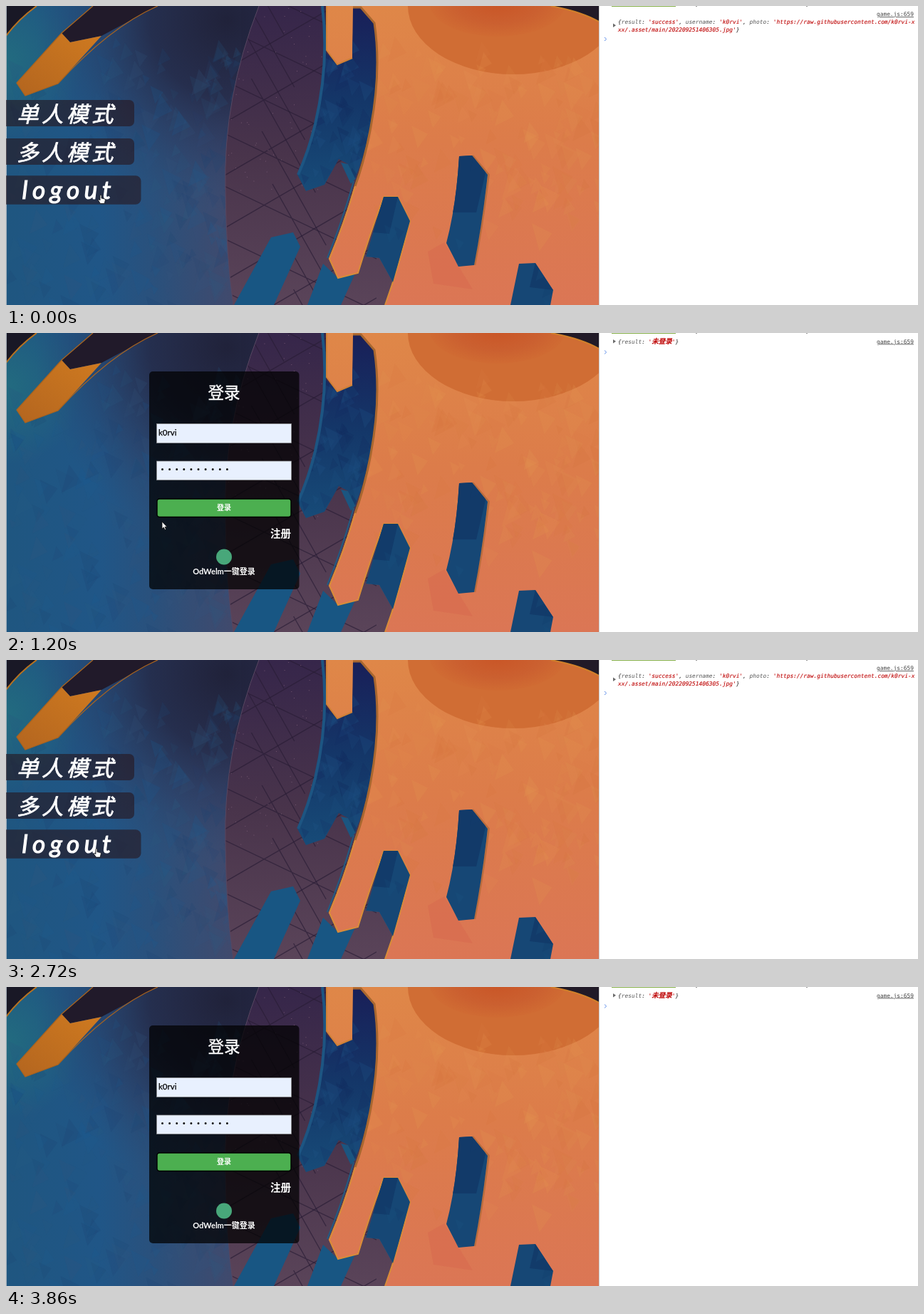
These frames come from a looping animation (1280 px wide and 420 px high, 4.07 s). An HTML page:

```html
<!DOCTYPE html>
<html lang="zh">
<head>
<meta charset="utf-8">
<style>
  html, body { margin: 0; width: 100%; height: 100%; overflow: hidden; background: #fff; }
  svg { display: block; width: 1280px; height: 420px; }
  text { font-family: Lato, "Noto Sans CJK SC", "Noto Sans CJK", sans-serif; fill: #fff; }
  .item { font-size: 30.5px; font-style: italic; letter-spacing: 4.4px; stroke: #fff; stroke-width: .8px; }
  .latin { font-size: 32px; letter-spacing: 6px; stroke-width: 1.1px; }
  .field { font-size: 10px; }
  .mid { text-anchor: middle; }
  .console text { font: italic 7.86px "DejaVu Sans Mono", "Noto Sans CJK SC", "Noto Sans CJK", monospace; fill: #222; }
  .console .key { fill: #555; }
  .console .str { fill: #c00d0d; stroke: #c00d0d; stroke-width: .15px; }
  .console .han { font-size: 9.5px; font-weight: 700; }
  .console .link { font-style: normal; fill: #444; text-anchor: end; text-decoration: underline; }
</style>
</head>
<body>
<svg viewBox="0 0 1280 420">
  <defs>
    <linearGradient id="blue">
      <stop offset="0" stop-color="#1f5680"/><stop offset=".4" stop-color="#205687"/>
      <stop offset=".65" stop-color="#2b507b"/><stop offset="1" stop-color="#43496b"/>
    </linearGradient>
    <radialGradient id="shade" gradientUnits="userSpaceOnUse" cx="310" cy="20" r="270">
      <stop offset="0" stop-color="#20223a"/><stop offset=".4" stop-color="#242a48" stop-opacity=".88"/>
      <stop offset=".7" stop-color="#2a3a60" stop-opacity=".5"/><stop offset="1" stop-color="#2a4a74" stop-opacity="0"/>
    </radialGradient>
    <radialGradient id="teal" gradientUnits="userSpaceOnUse" cx="0" cy="75" r="110">
      <stop offset="0" stop-color="#23707f" stop-opacity=".8"/><stop offset="1" stop-color="#23707f" stop-opacity="0"/>
    </radialGradient>
    <linearGradient id="purple" x2="0" y2="1">
      <stop offset="0" stop-color="#36264a"/><stop offset=".5" stop-color="#49344b"/><stop offset="1" stop-color="#5a4459"/>
    </linearGradient>
    <linearGradient id="orange" x2="0" y2="1">
      <stop offset="0" stop-color="#df8748"/><stop offset=".45" stop-color="#dc7c4a"/><stop offset="1" stop-color="#db7655"/>
    </linearGradient>
    <linearGradient id="navy" x2="0" y2="1">
      <stop offset="0" stop-color="#191f58"/><stop offset=".5" stop-color="#143668"/><stop offset="1" stop-color="#174b78"/>
    </linearGradient>
    <linearGradient id="amber" x1="1" y1="0" x2="0" y2="1">
      <stop offset="0" stop-color="#cf7a20"/><stop offset="1" stop-color="#b3651f"/>
    </linearGradient>
    <radialGradient id="glow"><stop offset="0" stop-color="#c95526"/><stop offset=".62" stop-color="#cb6030"/><stop offset="1" stop-color="#d06b33"/></radialGradient>
    <clipPath id="stage"><path d="M0 0H832V420H0Z"/></clipPath>
    <clipPath id="blueClip"><path d="M0 0H355Q304 130 308 260Q309 350 319 420H0Z"/></clipPath>
    <clipPath id="purpleClip"><path d="M355 0H520V420H319Q309 350 308 260Q304 130 355 0Z"/></clipPath>
    <clipPath id="orangeClip"><path id="orangeShape" d="M450 0V62L465 82L486 73L488 1L498 2L516 24Q526 90 511 170Q502 218 489 253Q474 305 453 355L466 382L494 375Q510 322 530 268H550L567 302Q552 365 532 420H832V0Z"/></clipPath>
    <clipPath id="navyClip"><path id="navyShape" d="M447 64L465 82L486 73L487 3L498 2L516 24Q526 90 511 170Q502 214 490 242L480 222L467 215L447 251L421 260L409 237Q446 150 447 64Z"/></clipPath>
    <clipPath id="holeClip"><path id="holeShape" d="M636 211L654 210L676 237Q669 302 657 364L635 366L618 333Q632 280 636 211ZM720 362L743 361L768 399L764 420H708ZM530 268H550L567 302L543 388L524 354L505 352Z"/></clipPath>
  </defs>

  <g clip-path="url(#stage)">
    <path d="M0 0H832V420H0Z" fill="url(#purple)"/>
    <g clip-path="url(#purpleClip)" id="grid" stroke="#291d35" stroke-width="1.4" stroke-opacity=".65"/>
    <g clip-path="url(#blueClip)">
      <path d="M0 0H330V420H0Z" fill="url(#blue)"/>
      <path d="M0 0H360V420H0Z" fill="url(#teal)"/>
      <path d="M0 0H360V420H0Z" fill="url(#shade)"/>
      <g id="blueFacets"/>
    </g>
    <path d="M355 0Q304 130 308 260Q309 350 319 420" fill="none" stroke="#574660"/>
    <path d="M0 0H42Q20 16 0 42Z" fill="#191826"/>
    <path d="M0 42Q18 18 43 0" fill="none" stroke="#b8711f" stroke-width="2"/>
    <path d="M78 38L122 0H212L134 42L90 51Z" fill="#211a2a"/>
    <path d="M15 108L78 38L90 51L134 42L73 109L27 126Z" fill="url(#amber)"/>
    <path d="M122 0L78 38L15 108L27 126L73 109Q145 30 213 0" fill="none" stroke="#a8631f" stroke-width="1.3"/>

    <path d="M320 420L372 325L403 318L413 338L376 420ZM423 420L445 362L466 382L490 376L470 420Z" fill="#185683"/>
    <path d="M480 222L491 242L484 250L470 220Z" fill="#1b5580"/>
    <use href="#orangeShape" fill="url(#orange)"/>
    <g clip-path="url(#orangeClip)">
      <ellipse cx="712" cy="0" rx="148" ry="96" fill="#d06d34"/>
      <ellipse cx="690" cy="-5" rx="96" ry="48" fill="url(#glow)"/>
      <g id="orangeFacets"/>
      <path d="M592 345L615 332L655 398L600 390Z" fill="#d8694f" opacity=".5"/>
      <path d="M765 0Q808 8 832 22V0Z" fill="#211a27"/>
      <path d="M765 0Q808 8 832 22" fill="none" stroke="#d0802a" stroke-width="2"/>
    </g>
    <use href="#navyShape" fill="url(#navy)"/>
    <g clip-path="url(#navyClip)" id="navyFacets"/>
    <g fill="none" stroke-width="2">
      <path d="M487 2L498 2L517 24Q527 90 512 170Q503 218 490 253" stroke="#a8672f" stroke-width="3"/>
      <path d="M490 253Q475 305 454 355L466 382L494 375Q510 322 530 268H550L567 302Q552 365 532 420" stroke="#d98d38"/>
      <path d="M488 246Q471 305 451 354" stroke="#215b83"/>
      <path d="M444 0Q454 80 434 166Q425 203 410 237" stroke="#1d5582" stroke-width="4"/>
      <path d="M450 0V62L465 82L486 73" stroke="#cf8136"/>
      <path d="M655 210L677.500 237Q670 302 658 364" stroke="#b96d3d" stroke-width="2.500"/>
    </g>
    <use href="#holeShape" fill="#164775"/>
    <g clip-path="url(#holeClip)">
      <path d="M636 205H680L660 290H620Z" fill="#123a69"/>
      <path d="M530 268H550L538 320L515 318Z" fill="#123b6a"/>
      <path d="M743 361L768 399L735 395Z" fill="#123b6a"/>
      <path d="M505 352L524 354L543 388Z" fill="#20638d"/>
      <g id="holeFacets"/>
    </g>
    <path d="M0 0H1V420H0Z" fill="#aab4bd"/>
  </g>

  <g id="menu">
    <g fill="#27151c" fill-opacity=".6">
      <rect x="-10" y="132" width="190" height="37" rx="7"/>
      <rect x="-10" y="186" width="190" height="37" rx="7"/>
    </g>
    <text class="item mid" x="85" y="162.500">单人模式</text>
    <text class="item mid" x="85" y="216.500">多人模式</text>
    <g id="logout">
      <rect x="-10" y="240" width="190" height="37" rx="7" fill="#27151c" fill-opacity=".6"/>
      <text class="item latin mid" x="88" y="270">logout</text>
    </g>
  </g>

  <g id="panel">
    <rect x="201" y="54" width="210.500" height="306" rx="5" fill-opacity=".73"/>
    <text class="mid" x="306" y="92" font-size="22.500" stroke="#fff" stroke-width=".4">登录</text>
    <g id="boxes" stroke="#8b8b8b" stroke-width=".7">
      <rect x="211.500" y="127.500" width="189" height="27"/>
      <rect x="211.500" y="180" width="189" height="26.500"/>
    </g>
    <g id="hints">
      <text class="field" x="214" y="144" style="fill:#757575">用户名</text>
      <text class="field" x="214" y="196" style="fill:#757575">密码</text>
    </g>
    <g id="filled">
      <text x="214" y="143.500" font-size="11.500" stroke="#000" stroke-width=".25" style="fill:#000">k0rvi</text>
      <path d="M219.500 191.500H311" stroke="#111" stroke-width="3" stroke-linecap="round" stroke-dasharray="0 10.100"/>
    </g>
    <rect x="212" y="233" width="188" height="25.500" rx="3.500" fill="#4caf50" stroke="#000" stroke-width="1.400"/>
    <text class="field mid" x="306" y="248.500" font-weight="700">登录</text>
    <text x="400" y="287" font-size="14.500" font-weight="700" text-anchor="end">注册</text>
    <circle cx="306" cy="314.500" r="11" fill="#48a77a"/>
    <text class="mid" x="306" y="338.500" font-size="11" font-weight="700">OdWelm一键登录</text>
  </g>

  <g class="console">
    <path d="M832 0H1280V420H832Z" fill="#fff"/>
    <path d="M832.500 0V420" stroke="#c9c9c9"/>
    <path d="M850 0H940V1H850Z" fill="#86b04a"/>
    <path d="M968 0h2v.8h-2zM1123 0h2v.8h-2z" fill="#777"/>
    <g id="userLog">
      <text class="link" x="1274" y="14">game.js:659</text>
      <path d="M852 24.500V30L856 27.200Z" fill="#6b6b6b"/>
      <text x="859" y="24.500">{<tspan class="key">result</tspan>: <tspan class="str">'success'</tspan>, <tspan class="key">username</tspan>: <tspan class="str">'k0rvi'</tspan>, <tspan class="key">photo</tspan>: <tspan class="str">'https://raw.githubusercontent.com/k0rvi-x</tspan></text>
      <text x="859" y="35.500"><tspan class="str">xx/.asset/main/202209251406305.jpg'</tspan>}</text>
    </g>
    <g id="guestLog">
      <text class="link" x="1274" y="14.500">game.js:659</text>
      <path d="M852 9V14.500L856 11.700Z" fill="#6b6b6b"/>
      <text x="859" y="14.500">{<tspan class="key">result</tspan>: <tspan class="str">'<tspan class="han">未登录</tspan>'</tspan>}</text>
    </g>
    <g id="successLog">
      <text class="link" x="1274" y="31">game.js:619</text>
      <path d="M852 25.500V31L856 28.200Z" fill="#6b6b6b"/>
      <text x="859" y="31">{<tspan class="key">result</tspan>: <tspan class="str">'success'</tspan>}</text>
    </g>
    <path id="prompt" d="M840 -2.500L842.700 0L840 2.500" fill="none" stroke="#5f8fe8"/>
  </g>

  <g id="cursor" stroke="#111" stroke-width=".8" stroke-linejoin="round" fill="#fff">
    <path id="arrow" d="M0 0V10L2.300 8L4 11.500L5.500 10.800L4 7.400H7Z"/>
    <path id="hand" d="M-1 1Q0 -.6 1 1V5L5.500 6Q6.500 6.400 6.300 8L5.200 12.500H-.5L-3.500 8Q-3.600 6.300 -2.200 7L-1 8Z"/>
  </g>
</svg>

<script>
const LOOP = 4070;
const $ = id => document.getElementById(id);
const show = (id, on) => $(id).setAttribute('display', on ? 'inline' : 'none');
const within = (t, from, to) => t >= from && t < to;

let seed = 7;
const random = () => (seed = (seed * 16807) % 2147483647) / 2147483647;
const pick = list => list[Math.floor(random() * list.length)];

// Scatter slanted triangles over an area for the faceted paint texture.
function facets(id, count, [x0, y0, x1, y1], colors, size, alpha) {
  let out = '';
  for (let i = 0; i < count; i++) {
    const x = x0 + random() * (x1 - x0), y = y0 + random() * (y1 - y0);
    const s = size * (0.5 + random()), flip = random() < 0.5 ? -1 : 1;
    out += `<path d="M${x} ${y}l${s * 0.8} ${flip * s * 0.4}l${-s * 0.5} ${flip * s * 0.7}z" ` +
      `fill="${pick(colors)}" opacity="${alpha * (0.4 + random() * 0.6)}"/>`;
  }
  $(id).innerHTML = out;
}
facets('blueFacets', 230, [0, 60, 320, 420], ['#1b5b90', '#34557c', '#1d4270', '#285a80'], 24, 0.24);
facets('orangeFacets', 150, [500, 70, 832, 310], ['#e0924f', '#d5753f', '#dd8b4f'], 24, 0.28);
facets('navyFacets', 60, [410, 60, 520, 255], ['#1d4a7c', '#122c5f', '#1d4f80'], 22, 0.38);
facets('holeFacets', 25, [505, 210, 770, 420], ['#1c5580', '#123c6a'], 20, 0.4);

// Crossing girders behind the tubes, with faint dust.
let girders = '';
for (let y = -120; y < 540; y += 74) {
  girders += `<path d="M300 ${y}l220 105M300 ${y + 66}l220 -128M${300 + (y + 120) / 5} ${y}l90 160"/>`;
}
for (let i = 0; i < 60; i++) {
  girders += `<circle cx="${310 + random() * 140}" cy="${random() * 260}" r=".5" stroke="none" fill="#80627a"/>`;
}
$('grid').innerHTML = girders;

// time, x, y of the pointer tip
const path = [
  [0, 133, 265], [30, 133, 265], [80, 132, 261], [1050, 132, 261], [1200, 219, 265], [1320, 219, 265],
  [1560, 310, 249], [1590, 310, 249], [1650, 314, 248], [2240, 314, 248], [2430, 186, 262],
  [2530, 186, 262], [2750, 118, 265], [2780, 114, 266], [2990, 114, 266], [3170, 291, 250],
  [3210, 291, 250], [3490, 560, 370], [3700, 820, 425], [LOOP, 820, 425]
];
function pointer(t) {
  const i = path.findIndex(p => p[0] > t);
  const [t0, x0, y0] = path[i - 1], [t1, x1, y1] = path[i];
  const k = (t - t0) / (t1 - t0);
  return [x0 + (x1 - x0) * k, y0 + (y1 - y0) * k];
}

function draw(t) {
  const login = within(t, 775, 2400) || t >= 3210;
  const filled = within(t, 1080, 2400) || t >= 3520;
  show('panel', login);
  show('menu', !login);
  show('filled', filled);
  show('hints', !filled);
  $('boxes').setAttribute('fill', filled ? '#e8f0fe' : '#fff');

  const grow = t < 2400 ? 1 : Math.min(1, Math.max(0, (t - 2540) / 120));
  const scale = 1 + 0.1 * grow;
  $('logout').setAttribute('transform', `translate(85 258.5) scale(${scale}) translate(-85 -258.5)`);

  const user = t < 600 || within(t, 2530, 3020);
  const guest = within(t, 810, 2270) || t >= 3240;
  const success = within(t, 2240, 2270);
  show('userLog', user);
  show('guestLog', guest);
  show('successLog', success);
  $('prompt').setAttribute('transform', `translate(0 ${user ? 46.5 : success ? 43.5 : guest ? 27 : 10})`);

  const hand = t < 1080 || within(t, 2550, 3010);
  show('hand', hand);
  show('arrow', !hand);
  show('cursor', t < 3700);
  $('cursor').setAttribute('transform', `translate(${pointer(t)})`);
}

function tick() {
  draw(performance.now() % LOOP);
  requestAnimationFrame(tick);
}
tick();
</script>
</body>
</html>
```
